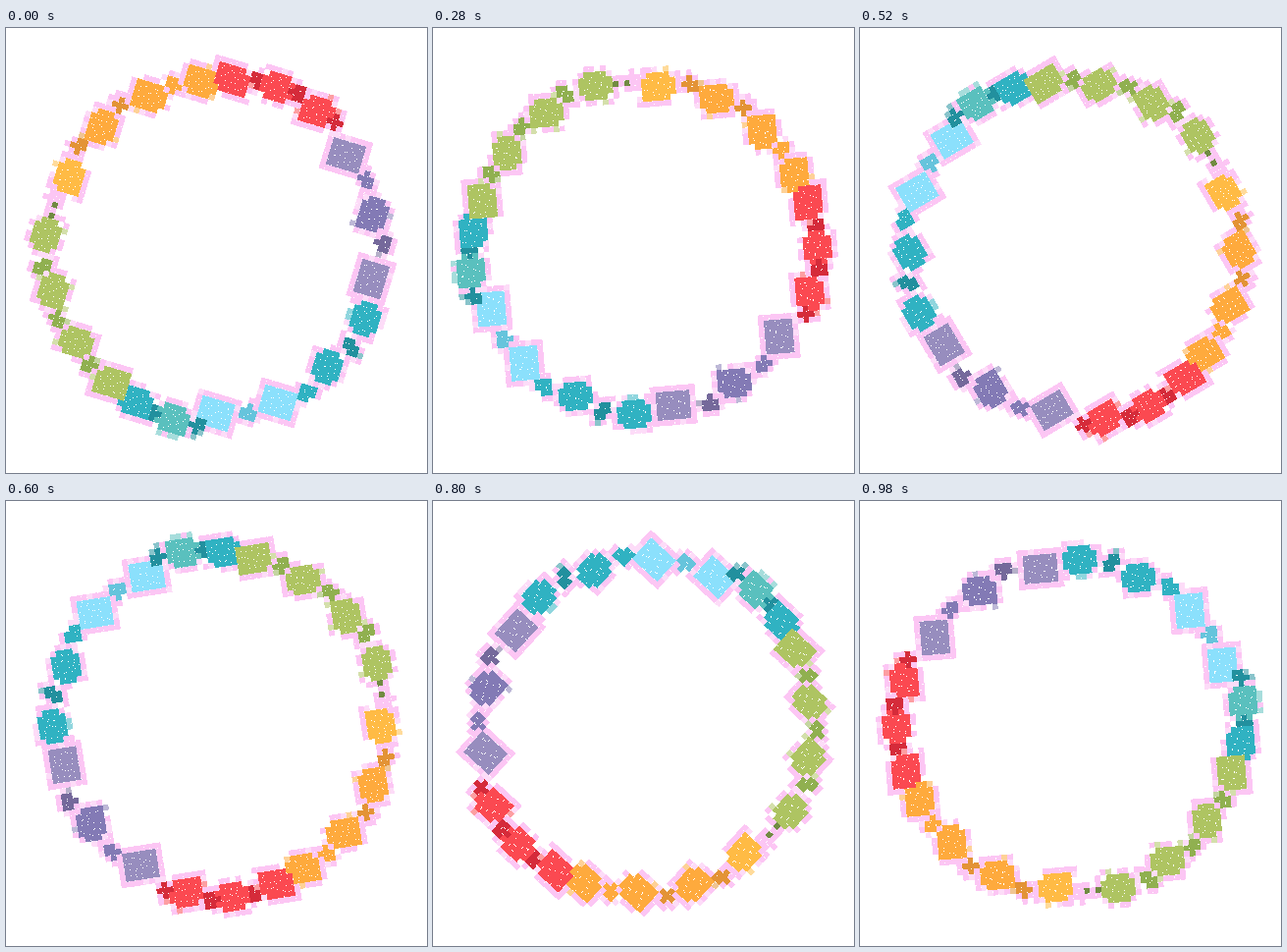
Write an HTML page that moves like this. It is 429 px wide and 453 px high and loops after 1 s.

```html
<!DOCTYPE html>
<html lang="en">
<head>
<meta charset="utf-8">
<title>Rotating pixel wreath</title>
<style>
html, body { margin: 0; width: 100%; height: 100%; overflow: hidden; background: #fff; }
svg { display: block; width: 429px; height: 453px; }
</style>
</head>
<body>
<svg viewBox="0 0 429 453" shape-rendering="crispEdges"><g id="ring"></g></svg>
<script>
const CELL = 5.8, GAP = 0.1;
const STEP = 20, LOOP = 1000, FPS = 60, TURN_FRAMES = 84;
const CENTER = [214.5, 226.5], TILT = 106.7;
const PINK = '#fcc6f4', PALE = '#fddcf8';
const ring = document.getElementById('ring');

// Capitals are large pieces, small letters are connectors.
const colors = {
  P: '#978dbe', V: '#837ab5', v: '#837ab5', w: '#75699b',
  T: '#30b2c2', t: '#30b2c2', d: '#22909e', S: '#8be0fc', s: '#66c4dc', A: '#5ac0be',
  G: '#aec462', g: '#90b050', e: '#718b42',
  Y: '#ffbb45', O: '#feaa3d', o: '#feaa3d', b: '#e39336', k: '#c37a2e',
  R: '#fb4951', r: '#d52b3a', l: PINK
};

// Each chain is spread evenly over an arc, in degrees.
const chains = [
  { pieces: 'PvVwP', from: 217, to: 263, radius: 163 },
  { pieces: 'TdTtSsS', from: 278, to: 343, radius: 166 },
  { pieces: 'dAdT', from: 350, to: 372, radius: 175 },
  { pieces: 'GgGgGgG', from: 382, to: 438, radius: 172 },
  { pieces: 'eelk', from: 85, to: 96, radius: 170 },
  { pieces: 'YbObOoO', from: 100, to: 159, radius: 170 },
  { pieces: 'RrRrRr', from: 169, to: 206, radius: 175 }
];

const filled = new Map(), halo = new Map();
const key = (x, y) => x + ',' + y;
const isLarge = piece => piece < 'a';
const isFramed = color => color === colors.P || color === colors.S;

function noise(x, y) {
  const n = Math.sin(x * 127.1 + y * 311.7) * 43758.5453;
  return n - Math.floor(n);
}

function sizeOf(piece) {
  if (isLarge(piece)) return [6, 5];
  return 'ek'.includes(piece) ? [1, 1] : [3, 3];
}

// The longer side of a piece follows the ring.
function addPiece(piece, degrees, radius) {
  const a = degrees * Math.PI / 180, r = radius / CELL;
  const cx = r * Math.cos(a), cy = r * Math.sin(a);
  let [w, h] = sizeOf(piece);
  if (Math.abs(cx) > Math.abs(cy)) [w, h] = [h, w];
  const left = Math.round(cx - w / 2), top = Math.round(cy - h / 2);
  const color = colors[piece];
  for (let x = 0; x < w; x++) for (let y = 0; y < h; y++) {
    const corner = x % (w - 1) === 0 && y % (h - 1) === 0;
    const cut = corner && !isFramed(color) && noise(left + x, top + y) < 0.7;
    if (!cut) filled.set(key(left + x, top + y), color);
  }
}

function addChain({ pieces, from, to, radius }) {
  [...pieces].forEach((piece, i) => {
    const degrees = from + (to - from) * i / (pieces.length - 1);
    addPiece(piece, degrees, radius + (isLarge(piece) ? 0 : 4));
  });
}

function haloColor(x, y, color, diagonal) {
  const r = noise(x + 0.5, y);
  if (isFramed(color)) return r < 0.85 ? PINK : PALE;
  if (diagonal && r > 0.3) return null;
  if (r < 0.6) return PINK;
  if (r < 0.8) return PALE;
  return r < 0.88 ? color + '88' : null;
}

function addHalo() {
  for (const [k, color] of filled) {
    const [x, y] = k.split(',').map(Number);
    for (let i = -1; i <= 1; i++) for (let j = -1; j <= 1; j++) {
      const n = key(x + i, y + j);
      if (filled.has(n) || halo.has(n)) continue;
      const tone = haloColor(x + i, y + j, color, i && j);
      if (tone) halo.set(n, tone);
    }
  }
}

function paint(cells) {
  const paths = {}, side = CELL - GAP;
  for (const [k, color] of cells) {
    const [x, y] = k.split(',').map(n => (n * CELL).toFixed(2));
    paths[color] = (paths[color] || '') + `M${x} ${y}h${side}v${side}h${-side}z`;
  }
  for (const color in paths) {
    const path = document.createElementNS('http://www.w3.org/2000/svg', 'path');
    path.setAttribute('d', paths[color]);
    path.setAttribute('fill', color);
    ring.append(path);
  }
}

// Motion at 60 frames a second, shown every 20 ms; the loop cuts the turn short.
function draw() {
  const tick = Math.floor(performance.now() % LOOP / STEP);
  const frame = Math.floor(tick * STEP * FPS / 1000);
  ring.setAttribute('transform', `translate(${CENTER}) rotate(${TILT + frame * 360 / TURN_FRAMES})`);
  requestAnimationFrame(draw);
}

chains.forEach(addChain);
addHalo();
paint(halo);
paint(filled);
draw();
</script>
</body>
</html>
```
